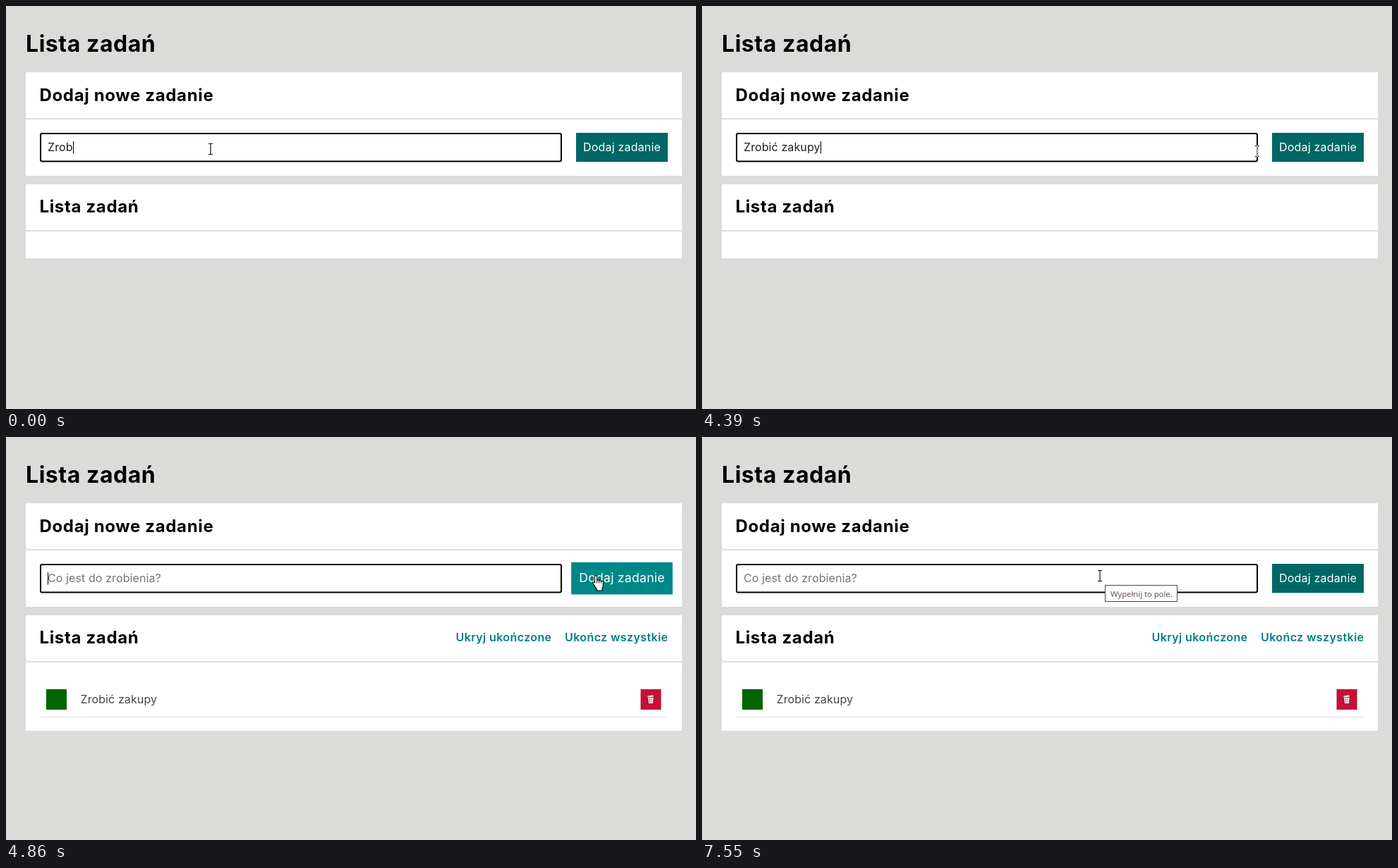
An HTML page that plays this animation: 978x572 px, repeating every 8000 ms.

```html
<!DOCTYPE html>
<html lang="pl">
<head>
<meta charset="utf-8">
<title>Lista zadań</title>
<style>
  html, body { margin: 0; width: 100%; height: 100%; overflow: hidden; background: #dbdbd9; }
  svg { display: block; width: 978px; height: 572px; font: 400 16px Inter, sans-serif; letter-spacing: .1px; }
  .title { font-size: 32px; font-weight: 700; letter-spacing: .55px; }
  .heading { font-size: 24px; font-weight: 700; letter-spacing: .65px; }
  .link { font-weight: 600; letter-spacing: .4px; fill: #008080; }
  .rule { fill: #dddddc; }
  .panel { fill: #fff; }
  #entry { white-space: pre; }
  #beam { mix-blend-mode: difference; }
</style>
</head>
<body>
<svg viewBox="0 0 978 572">
  <rect width="978" height="572" fill="#dbdbd9"/>
  <text class="title" x="28" y="65">Lista zadań</text>

  <rect class="panel" x="28" y="94" width="930" height="147"/>
  <text class="heading" x="47.5" y="135">Dodaj nowe zadanie</text>
  <rect class="rule" x="28" y="159" width="930" height="2"/>
  <rect id="field" x="49" y="181" width="738" height="39.5" fill="#fff" stroke-width="2"/>
  <text id="entry" x="59" y="205.5"></text>
  <rect id="caret" y="192" width="1" height="17.5"/>

  <g id="button">
    <rect id="buttonFill" x="808" y="180" width="130" height="41.3"/>
    <text x="873" y="205.5" fill="#fff" text-anchor="middle" letter-spacing=".2">Dodaj zadanie</text>
  </g>

  <rect class="panel" id="list" x="28" y="253" width="930"/>
  <text class="heading" x="47.5" y="293">Lista zadań</text>
  <rect class="rule" x="28" y="318" width="930" height="2"/>
  <g id="task">
    <text class="link" x="637.5" y="290">Ukryj ukończone</text>
    <text class="link" x="938.5" y="290" text-anchor="end">Ukończ wszystkie</text>
    <rect x="57" y="358" width="29" height="29" fill="#006400"/>
    <text x="105.5" y="377.5" fill="#444">Zrobić zakupy</text>
    <rect x="899.5" y="358" width="29" height="29" fill="#c41138"/>
    <path d="M909.5 367.5l8-1v2.2l-8 .6zM910.2 370h7.4l-.8 8h-5.8z" fill="#fff"/>
    <path d="M912.5 371v6M915 371v6" stroke="#c41138" stroke-width=".8"/>
    <rect class="rule" x="48" y="397" width="890" height="1"/>
  </g>

  <g id="tooltip">
    <rect x="571.5" y="210.5" width="102" height="23" fill="#fff" stroke="#4b4145"/>
    <text x="579" y="227" font-family="Open Sans, sans-serif" font-size="11.3" letter-spacing="0" fill="#5a4a52">Wypełnij to pole.</text>
  </g>

  <circle id="click" r="11.5" fill="#faee00" fill-opacity=".52"/>
  <g id="beam">
    <path d="M-3 -7.5h2.5l.5 .5 .5 -.5h2.5M0 -7v14M-3 7.5h2.5l.5 -.5 .5 .5h2.5" fill="none" stroke="#fff" stroke-width="1.1"/>
  </g>
  <g id="hand">
    <path d="M-1.5 1.5q0-1.8 1.6-1.8t1.6 1.8v5q1.3-1.2 3 .3 1.6-1 2.8.6 2.8-.8 2.8 2v5q0 2-1.4 4v2.6h-7.6v-2.2q-2.7-3-3.8-6-2.3-2.2-1.9-3.5 1.2-1.3 2.9.7z" fill="#fff" stroke="#000" stroke-width="1.1" stroke-linejoin="round"/>
    <path d="M1.7 6.5v4M4.7 7v3.5M7.5 8v2.5" stroke="#000"/>
  </g>
</svg>
<script>
const LOOP = 8000, BLINK = 538;
const PRESSED = 4720, ADDED = 4860, TOOLTIP = 6150;
const TASK = 'Zrobić zakupy';
const PLACEHOLDER = 'Co jest do zrobienia?';
const keyTimes = [0, 210, 820, 1210, 1540, 1760, 2160, 2500, 2760, 3240];
const LETTERS_BEFORE = 3;

const $ = id => document.getElementById(id);
const set = (id, attrs) => {
  for (const name in attrs) $(id).setAttribute(name, attrs[name]);
};
const show = (id, on) => set(id, { visibility: on ? 'visible' : 'hidden' });
const progress = (t, start, length) => Math.min(1, Math.max(0, (t - start) / length));
const ease = (t, start, length) => {
  const p = progress(t, start, length);
  return p * p * (3 - 2 * p);
};

function drawField(t) {
  const added = t >= ADDED;
  const focused = t < PRESSED || added;
  const pressed = keyTimes.filter(time => time <= t);
  const lastInput = added ? ADDED : pressed.at(-1);
  const blinkOn = Math.floor((t - lastInput) / BLINK) % 2 === 0;

  $('entry').textContent = added ? PLACEHOLDER : TASK.slice(0, LETTERS_BEFORE + pressed.length);
  set('entry', { fill: added ? '#757575' : '#222' });
  set('field', { stroke: focused ? '#000' : '#dddddc', rx: focused ? 2 : 0 });
  set('caret', { x: 59 + (added ? 0 : Math.round($('entry').getComputedTextLength())) });
  show('caret', focused && blinkOn);
}

function drawButton(t) {
  const hover = ease(t, 4440, 420) - ease(t, 5060, 420);
  const tone = Math.round(102 + 33 * hover);
  set('button', { transform: `translate(873 200.6) scale(${1 + .105 * hover}) translate(-873 -200.6)` });
  set('buttonFill', { fill: `rgb(0,${tone},${tone})` });
}

function drawPointer(t) {
  const there = ease(t, 4085, 375);
  const back = ease(t, 4900, 710);
  const arc = 15 * Math.sin(Math.PI * progress(t, 4085, 375));
  const x = 290 + 546 * there - 272 * back;
  const y = 203 - 6 * there + arc;
  const at = { transform: `translate(${Math.round(x)} ${Math.round(y)})` };
  const overButton = x > 800;
  set('hand', at);
  set('beam', at);
  set('click', at);
  show('hand', overButton);
  show('beam', !overButton);
  show('click', t >= PRESSED && t < ADDED);
}

function render(t) {
  drawField(t);
  drawButton(t);
  drawPointer(t);
  set('list', { height: t >= ADDED ? 164 : 105 });
  show('task', t >= ADDED);
  show('tooltip', t >= TOOLTIP);
}

const start = performance.now();
function tick() {
  render((performance.now() - start) % LOOP);
  requestAnimationFrame(tick);
}
tick();
</script>
</body>
</html>
```
